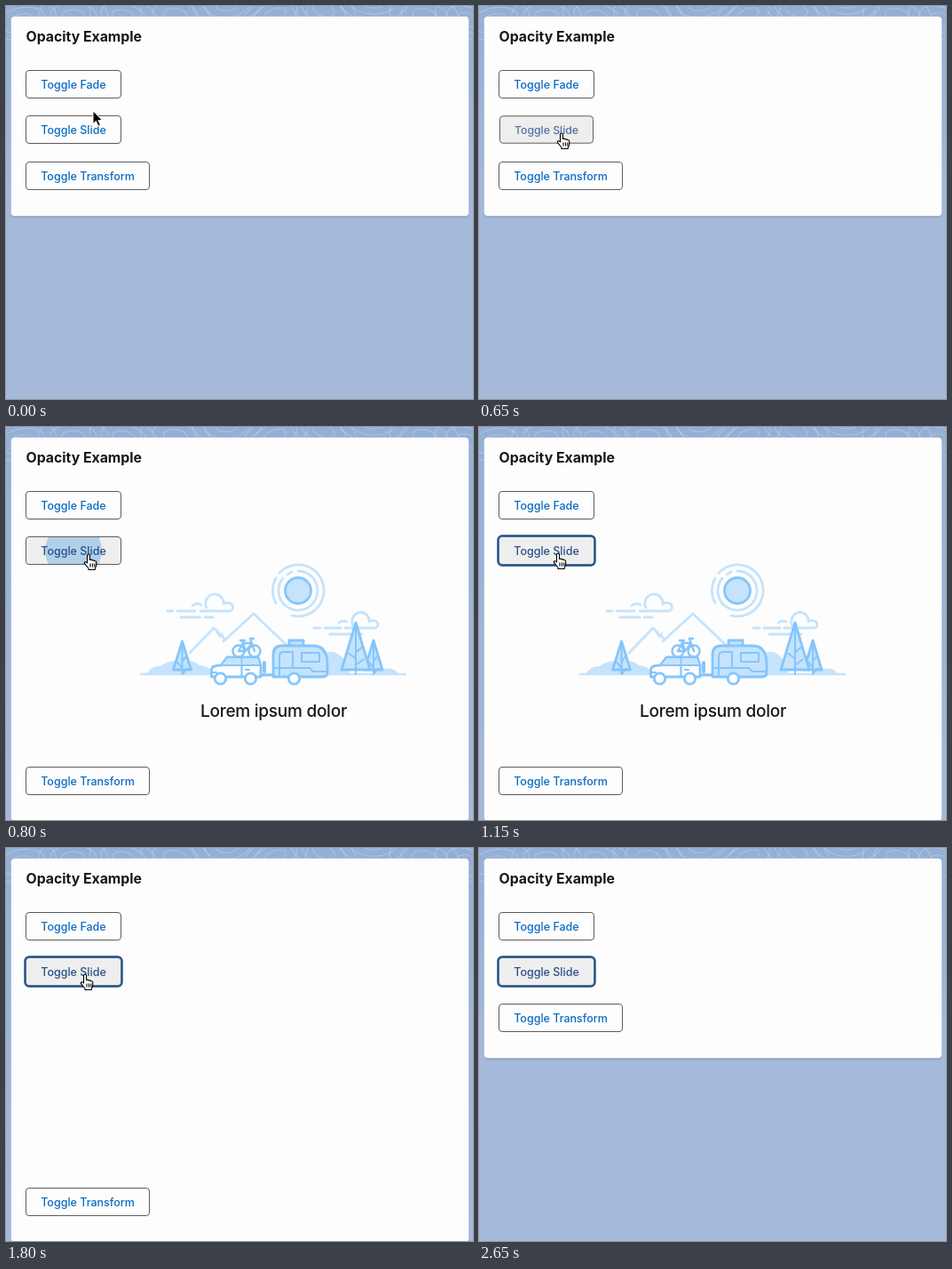
An HTML page for the animation above (2700 ms loop, 526 by 442 pixels).

```html
<!DOCTYPE html>
<html lang="en">
<head>
<meta charset="utf-8">
<title>Opacity Example</title>
<style>
html, body { margin: 0; width: 100%; height: 100%; overflow: hidden; }
body {
  position: relative; background: #a5b9da;
  font-family: Inter, "Liberation Sans", sans-serif;
}
#sky { position: absolute; left: 0; top: 0; width: 100%; background: linear-gradient(#94afd6, #a5b9da); }
svg { position: absolute; left: 0; top: 0; width: 526px; height: 442px; }
#card {
  position: absolute; left: 6px; top: 12px; width: 515px;
  box-sizing: border-box; border-radius: 4px; background: #fdfdfd;
  box-shadow: 0 0 0 .5px #c3c9d4, 0 2px 2px rgba(0, 0, 0, .14);
}
h1 {
  position: absolute; left: 22.5px; top: 25px; margin: 0;
  font-size: 15.8px; line-height: 20px; font-weight: 700; color: #181818;
  white-space: nowrap;
}
.btn {
  position: absolute; left: 22px; width: 108px; height: 32px;
  box-sizing: border-box; border: 1px solid #5c5c5c; border-radius: 4px;
  background: #fdfdfd; color: #0b6bc2; text-align: center; font-weight: 500;
  font-size: 12.5px; line-height: 30px; white-space: nowrap; overflow: hidden;
}
.btn span { position: relative; top: 1px; }
#ripple { position: absolute; border-radius: 50%; background: #b0d0ea; }
</style>
</head>
<body>
<div id="sky"></div>
<svg id="contours" fill="none" stroke="#fff" stroke-opacity=".24"></svg>
<div id="card"></div>
<h1>Opacity Example</h1>
<div class="btn" style="top:72px"><span>Toggle Fade</span></div>
<div class="btn" id="slide" style="top:123px"><i id="ripple"></i><span>Toggle Slide</span></div>
<div class="btn" id="transform" style="width:140px"><span>Toggle Transform</span></div>

<svg>
  <g id="scene" fill="none" stroke-linecap="round" stroke-linejoin="round">
    <!-- pale background -->
    <g stroke="#c5e3fc" stroke-width="2.800">
      <path d="M270 164A29 29 0 1 1 284 212M266 170A29 29 0 0 0 266 198"/>
      <path d="M291 162A22 22 0 1 1 274 170M279 166A22 22 0 0 1 284 163"/>
      <path d="M144 207h6M155 207h20M181 207h32a4.500 4.500 0 0 0 0-9q-3-1-6 1a10 10 0 0 0-20-2q-1 4 1 6M172 201q4-4 10-1M159 214h22M186 214h9"/>
      <path d="M309 226h7M321 226h18M344 226h33a4 4 0 0 0 0-8q-3-1-6 1a9.500 9.500 0 0 0-19-2q-1 4 1 6M337 220q4-3 9-1M327 233h24M355 233h8"/>
      <path d="M169 254L196 226L208 238M207 241L241 210L283 250"/>
      <path d="M114 278H412" stroke-width="2.400"/>
    </g>
    <g fill="#c5e3fc">
      <path d="M196 226L211 240L208 239L206 230L203 238L199 232Z"/>
      <path d="M120 278Q126 268 136 269Q146 261 160 264Q172 261 180 268Q190 268 197 278Z"/>
      <path d="M318 278V256Q330 249 338 257Q346 262 349 278Z"/>
      <path d="M376 278Q382 269 390 272Q399 270 404 278Z"/>
    </g>

    <g stroke="#85c5fb" stroke-width="2.800" fill="#c5e3fc">
      <circle cx="291" cy="184" r="14.500"/>
      <g id="trees"></g>
      <!-- caravan -->
      <path d="M281 245V240H297V245"/>
      <path d="M263 281V256Q263 246 273 246H308Q324 246 324 267V276Q324 281 319 281Z"/>
      <path d="M270 281V258Q270 253 275 253H285V271M295 254H315V264H295ZM264 271H304L308 275H323" stroke-width="2"/>
      <path d="M250 279H263"/>
      <circle cx="286.500" cy="283" r="6.200" fill="#fdfdfd"/>
      <!-- car -->
      <path d="M253 265V275" stroke-width="4"/>
      <path d="M204 268L211 259H246L249 268V281H193.500V273Q193.500 268 204 268Z" fill="#fdfdfd"/>
      <path d="M205 268L212 260H226V268ZM229 260H245L248 268H229Z" stroke="none"/>
      <path d="M204 268H249M227.500 260V281M194 276H199M232 273H236" stroke-width="2.200"/>
      <circle cx="203.500" cy="283" r="6.200" fill="#fdfdfd"/>
      <circle cx="237.500" cy="283" r="6.200" fill="#fdfdfd"/>
      <!-- bicycle -->
      <g fill="none" stroke-width="2.400">
        <circle cx="224" cy="252" r="6.500"/><circle cx="242" cy="252" r="6.500"/>
        <path d="M224 252L229 243H239L232 252H224M229 243L232 252M242 252L237 238H241M226 240H231M229 243L228 240"/>
      </g>
    </g>
    <text x="263.500" y="326" text-anchor="middle" font-size="19" font-weight="450" letter-spacing="-.25" fill="#181818">Lorem ipsum dolor</text>
  </g>

  <path id="arrow" d="M0 0V14.500L3.400 11.400L5.800 17L8.400 15.900L6 10.500H10.500Z"
        fill="#000" stroke="#fff" stroke-width="1"/>
  <path id="hand" d="M-1.500 9.500V1.500a1.500 1.500 0 0 1 3 0v5q2-1 2.600.6 2-.8 2.600.7 2-.5 2 1.500v3q0 2-1.500 4v1.200H0V16L-4.500 10.700q-.8-1.800 1-2 1 0 2 1.300zM2 10.500v4M4.500 10.500v4M6.800 10.500v4"
        fill="#fff" stroke="#000" stroke-width="1.100" stroke-linejoin="round"/>
</svg>

<script>
const LOOP = 2700, STEP = 50;
const $ = id => document.getElementById(id);
const part = (t, from, to) => Math.min(1, Math.max(0, (t - from) / (to - from)));
const smooth = u => u * u * (3 - 2 * u);
const place = (id, x, y) => $(id).setAttribute('transform', `translate(${x} ${y})`);
const show = (id, on) => { $(id).style.display = on ? '' : 'none'; };

function tree(x, top, half) {
  const h = 273 - top, y = top + h * .5;
  return `<path d="M${x} ${top}L${x + half} 273H${x - half}Z"/>` +
    `<path d="M${x} ${top + 6}V278M${x} ${y + 7}l${half * .45} -6M${x} ${y + 14}l${-half * .5} -6M${x} ${y + 21}l${half * .55} -6" stroke-width="2"/>`;
}

function contours() {
  let seed = 7, out = '';
  const rnd = () => (seed = seed * 16807 % 2147483647) / 2147483647;
  for (let i = 0; i < 10; i++) {
    const cx = 18 + i * 55 + rnd() * 14, cy = rnd() * 26 - 8, tilt = rnd() * 50 - 25;
    for (let k = 1; k < 4; k++) {
      out += `<ellipse cx="${cx}" cy="${cy}" rx="${k * 13}" ry="${k * 7}" transform="rotate(${tilt} ${cx} ${cy})"/>`;
    }
  }
  return out;
}

function drawButton(t, over) {
  const pressed = (t >= 600 && t < 700) || t === 1250;
  const focus = t >= 950;
  const s = $('slide').style;
  s.background = over ? '#eeeeee' : '#fdfdfd';
  s.color = pressed ? '#5270a6' : over ? '#2a5088' : '#0b6bc2';
  s.transform = pressed ? 'scale(.981)' : '';
  s.borderColor = focus ? '#55698a' : '#5c5c5c';
  s.boxShadow = focus ? '0 0 0 1.7px #1d4f8c' : '';

  const start = t < 1250 ? 700 : 1300;
  const age = t - start;
  const r = 14 + age * .18;
  const rs = $('ripple').style;
  rs.width = rs.height = 2 * r + 'px';
  rs.left = 53 - r + 'px';
  rs.top = 15 - r + 'px';
  rs.opacity = age < 0 ? 0 : 1 - part(age, 100, 300);
}

function drawScene(t) {
  const into = part(t, 700, 1100), out = part(t, 1250, 1650);
  show('scene', t >= 700 && t < 1650);
  place('scene', 120 * (1 - into) ** 4 + 484 * out * out, 0);
  $('scene').style.opacity = Math.min(part(t, 690, 760), 1 - out * out);
}

function drawCursor(t) {
  const down = smooth(part(t, 0, 550)), drift = smooth(part(t, 800, 1100));
  const x = 98 - 5 * down - 4 * drift;
  const y = 118 + 25 * down - drift;
  const over = y > 123;
  place('arrow', x, y);
  place('hand', x, y);
  show('arrow', !over);
  show('hand', over && t < 2450);
  return over;
}

function render(t) {
  const shift = t >= 700 && t < 1900 ? 207 : 0;
  $('sky').style.height = 236 + shift + 'px';
  $('card').style.height = 223.5 + shift + 'px';
  $('transform').style.top = 175 + shift + 'px';
  drawButton(t, drawCursor(t));
  drawScene(t);
}

$('contours').innerHTML = contours();
$('trees').innerHTML = tree(160.5, 241, 10) + tree(376, 240, 10) + tree(356, 220, 16);

const begin = performance.now();
function frame() {
  const t = (performance.now() - begin) % LOOP;
  render(Math.floor(t / STEP) * STEP);
  requestAnimationFrame(frame);
}
render(0);
requestAnimationFrame(frame);
</script>
</body>
</html>
```
